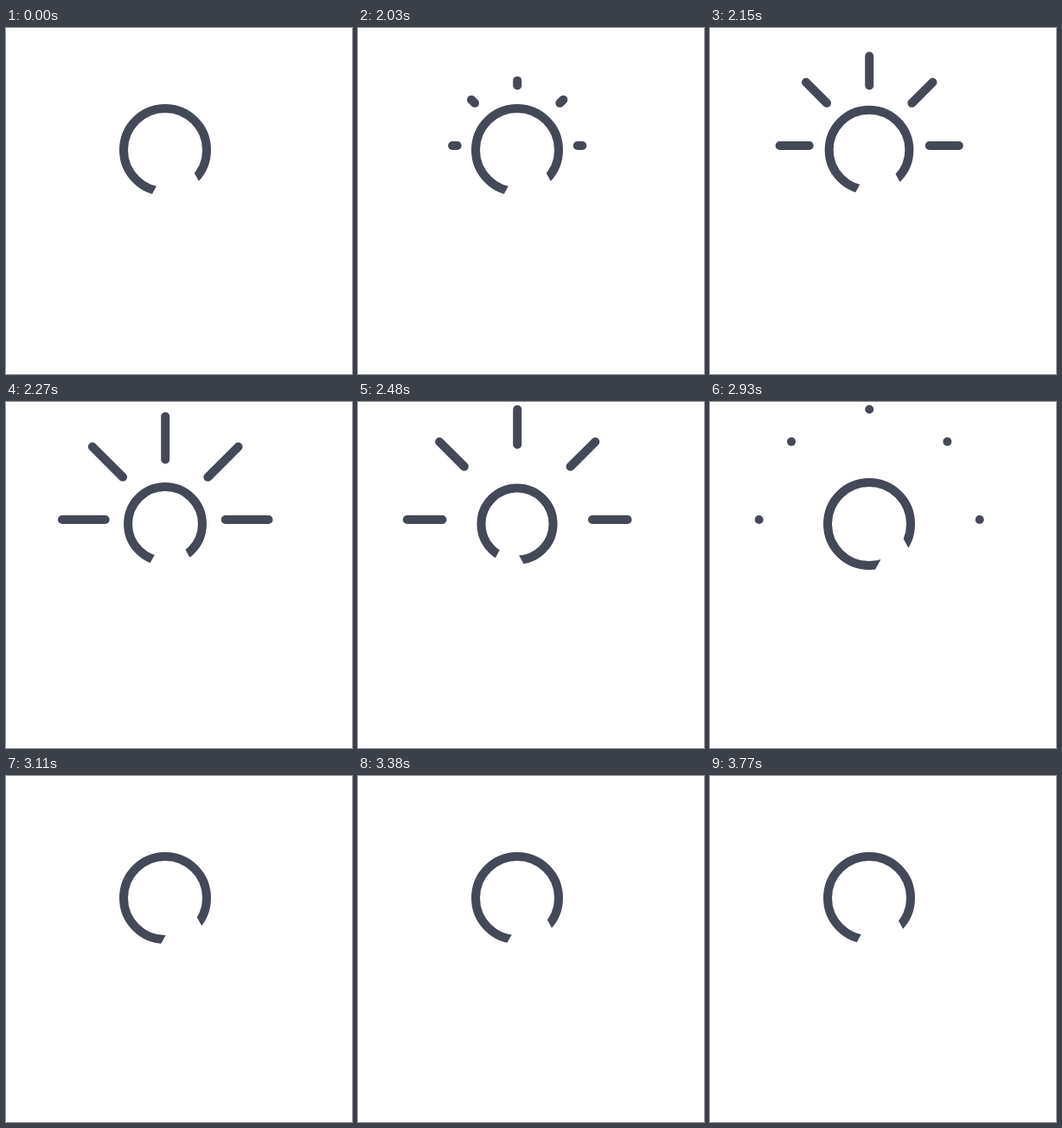
Write an HTML page that moves like this. It is 400x400 px and loops after 3860 ms.

```html
<!DOCTYPE html>
<html lang="en">
<head>
<meta charset="utf-8">
<title>Sun</title>
<style>
  html, body { margin: 0; width: 100%; height: 100%; overflow: hidden; background: #fff; }
  svg { display: block; width: 100vw; height: 100vh; }
</style>
</head>
<body>
<svg viewBox="0 0 400 400">
  <g fill="none" stroke="#444957" stroke-width="10">
    <circle id="ring" cx="184" cy="141" r="48"/>
    <g id="rays" stroke-linecap="round"></g>
  </g>
  <!-- white peaks that cut the gap into the ring -->
  <path id="leaving" fill="#fff" d="M0 0L54.5 100H-54.5Z"/>
  <path id="entering" fill="#fff" d="M0 0L54.5 100H-54.5Z"/>
</svg>
<script>
const LOOP = 3860, START = 2030, STEP = 30, LAST = 3770;
const RAY = { x: 184.2, y: 136, from: 69.5, to: 127.5, time: 540, gone: 2960 };
const PEAK = { x: 200, y: 135 };

const el = id => document.getElementById(id);
const ring = el('ring'), rays = el('rays'), leaving = el('leaving'), entering = el('entering');

const progress = (t, start, time) => Math.min(1, Math.max(0, (t - start) / time));
const easeOut = u => 1 - (1 - u) ** 3;
const easeInOut = u => (1 - Math.cos(Math.PI * u)) / 2;

const lines = [180, 225, 270, 315, 360].map(deg => {
  const node = document.createElementNS('http://www.w3.org/2000/svg', 'line');
  rays.appendChild(node);
  const a = deg * Math.PI / 180;
  return { node, cos: Math.cos(a), sin: Math.sin(a) };
});

function place(peak, dx, slope) {
  const x = PEAK.x + dx, y = PEAK.y + Math.abs(dx) * slope;
  peak.setAttribute('transform', `translate(${x} ${y})`);
}

function drawRays(t) {
  const reach = start =>
    RAY.from + (RAY.to - RAY.from) * easeOut(progress(t, start, RAY.time));
  const outer = reach(2012), inner = reach(2420);
  for (const { node, cos, sin } of lines) {
    node.setAttribute('x1', RAY.x + inner * cos);
    node.setAttribute('y1', RAY.y + inner * sin);
    node.setAttribute('x2', RAY.x + outer * cos);
    node.setAttribute('y2', RAY.y + outer * sin);
  }
}

function draw(time) {
  const moving = time >= START;
  const t = moving
    ? Math.min(LAST, START + Math.floor((time - START) / STEP) * STEP)
    : 0;

  const squeeze = easeInOut(progress(t, START, 370)) - easeInOut(progress(t, 2400, 450));
  ring.setAttribute('r', 48 - 7 * squeeze);

  rays.style.display = moving && t < RAY.gone ? '' : 'none';
  drawRays(t);

  // one peak speeds off to the left, the next one glides in from the right
  place(leaving, moving ? -50 * ((t - 1990) / 670) ** 2 : 0, 0.7);
  entering.style.display = moving ? '' : 'none';
  place(entering, 17 * Math.exp((2930 - t) / 255), 0.65);
}

const begin = performance.now();
function tick() {
  draw((performance.now() - begin) % LOOP);
  requestAnimationFrame(tick);
}
tick();
</script>
</body>
</html>
```
